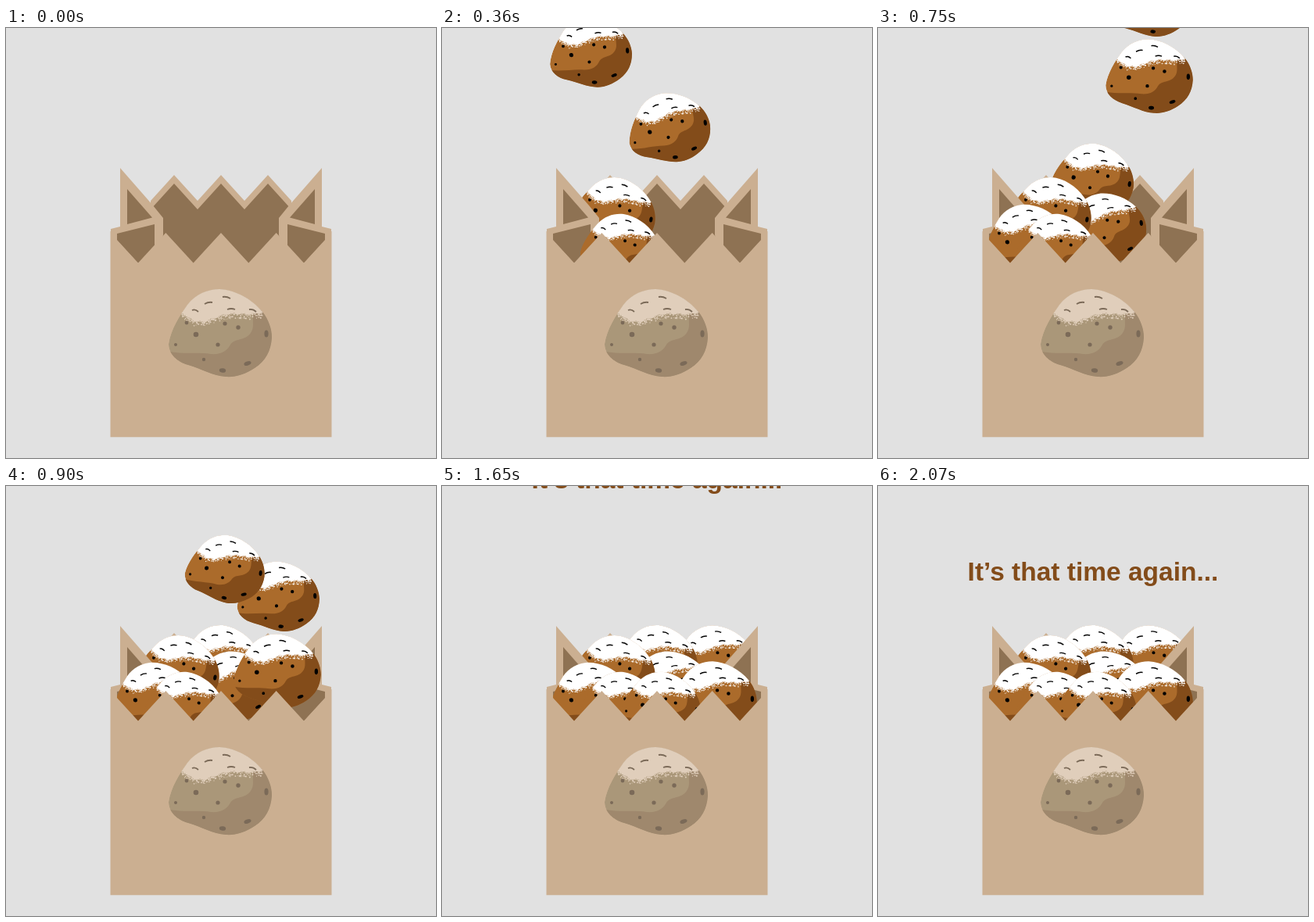
These frames come from a looping animation (550x550 px, 2.67 s). An HTML page with a canvas:

```html
<!DOCTYPE html>
<html lang="en">
<head>
<meta charset="utf-8">
<title>It’s that time again</title>
<style>
  html, body { margin: 0; height: 100%; overflow: hidden; background: #e1e1e1; }
  canvas { display: block; }
</style>
</head>
<body>
<canvas width="550" height="550"></canvas>
<script>
const ctx = document.querySelector('canvas').getContext('2d');
const LOOP = 2670, STEP = 30, FALL_SPEED = 35 / 30;
const PAPER = '#cbaf91', INSIDE = '#8e7253';
const FRESH = { crust: '#ab6b2b', shade: '#834c1a', sugar: '#fff', spot: '#000' };
const PRINTED = { crust: '#aa9779', shade: '#9f886d', sugar: '#e0cebb', spot: '#7b6a58' };

const points = (count, at) => Array.from({ length: count }, (_, i) => at(i));
const zigzag = (x, step, low, high) => points(7, i => [x + i * step, i % 2 ? high : low]);

// Bun shapes, drawn around (274, 390)
const body = new Path2D('M208 404C211 385 222 368 232 354C243 340 258 334 273 334C293 335 314 346 328 363C336 373 340 385 340 396C339 413 332 426 318 435C306 443 293 447 281 446C265 445 250 436 233 431C219 427 208 417 208 404Z');
const shade = new Path2D('M205 413C225 418 245 414 262 417C275 418 283 413 287 405C293 396 305 401 313 390C318 383 315 375 316 366L345 350V450H205Z');
const dashes = new Path2D('M238 361q4-2 8 2M254 353q5-3 10-2M277 344q5-1 10 2M283 360q5-2 10 0M311 360q5-1 9 3');

const spots = new Path2D();
function addSpot(x, y, rx, ry = rx, turn = 0) {
  spots.moveTo(x, y);
  spots.ellipse(x, y, rx, ry, turn, 0, 7);
}
addSpot(231, 377, 2.4);
addSpot(243, 392, 3.3);
addSpot(217, 405, 2);
addSpot(253, 424, 2.2);
addSpot(271, 405, 2.6);
addSpot(280, 378, 2.6);
addSpot(297, 383, 2.7);
addSpot(333, 391, 2.6, 4.5);
addSpot(309, 429, 4.7, 2.5, -0.3);
addSpot(277, 438, 4.2, 2.8, 0.1);

// Wavy lower edge of the icing, with loose grains below it
function icingEdge(x) {
  const a = (x - 224) / 104 * Math.PI;
  return 364 + 7 * Math.sin(a) + 5 * Math.sin(2 * a) + 3 * Math.sin(3 * a) + 0.8 * Math.sin(15 * a);
}
const sugar = new Path2D(`M${points(57, i => [220 + i * 2, icingEdge(220 + i * 2)])} 340 325 215 325Z`);
let seed = 11;
const random = () => (seed = seed * 16807 % 2147483647) / 2147483647;
for (let i = 0; i < 190; i++) {
  const x = 224 + random() * 104, y = icingEdge(x) + random() ** 2 * 6;
  sugar.moveTo(x, y);
  sugar.arc(x, y, 0.4 + random() * 0.6, 0, 7);
}

// x, resting y, degrees, landing time, scale; listed back to front
const backRow = [[348, 223, -2, 970], [275, 223, 7.5, 776], [290, 256, -9, 470], [221, 236, 10, 261]];
const frontRow = [[347, 271.5, 0, 930, .845], [190, 270.5, -4, 565], [228.5, 281, 6, 291, .77], [280.5, 281, 6, 1050, .77]];

function fill(color, path) {
  ctx.fillStyle = color;
  ctx.fill(path, 'nonzero');
}

function polygon(color, corners) {
  fill(color, new Path2D(`M${corners}Z`));
}

function drawBun(x, y, degrees, scale, colors) {
  ctx.save();
  ctx.translate(x, y);
  ctx.rotate(degrees * Math.PI / 180);
  ctx.scale(scale, scale);
  ctx.translate(-274, -390);
  ctx.clip(body);
  fill(colors.crust, body);
  fill(colors.shade, shade);
  fill(colors.sugar, sugar);
  fill(colors.spot, spots);
  ctx.strokeStyle = colors.spot;
  ctx.lineWidth = 1.8;
  ctx.stroke(dashes);
  ctx.restore();
}

function drawRow(row, t) {
  for (const [x, y, degrees, landing, scale = .8] of row) {
    drawBun(x, y - Math.max(0, landing - t) * FALL_SPEED, degrees, scale, FRESH);
  }
}

function drawFlap() {
  polygon(PAPER, '146 179 188 227 201 243 201 265 190 300 134 300 134 257 146 254');
  polygon(INSIDE, '155 206 155 251 187 242.5');
  polygon(INSIDE, '142 263 190 251 190 290 169 301 142 272');
}

function drawBag(t) {
  polygon(PAPER, [zigzag(185, 30, 221, 188), '365 300 185 300']);
  polygon(INSIDE, [zigzag(185, 30, 232, 199), '365 305 185 305']);
  drawRow(backRow, t);

  drawFlap();
  ctx.save();
  ctx.translate(550, 0);
  ctx.scale(-1, 1);
  drawFlap();
  ctx.restore();

  drawRow(frontRow, t);
  polygon(PAPER, ['133.5 260 142 260 142 271', zigzag(169, 35.33, 300.5, 262), '408 271 408 260 416.5 260 416.5 523.3 133.5 523.3']);
  drawBun(274, 390, 0, 1, PRINTED);
}

function drawTitle(progress) {
  ctx.font = 'bold 33.5px "Liberation Sans", Arial, sans-serif';
  ctx.textAlign = 'center';
  ctx.fillStyle = FRESH.shade;
  ctx.fillText('It’s that time again...', 275, 2.5 + 118.5 * progress);
}

function drawScene(t) {
  ctx.clearRect(0, 0, 550, 550);
  drawBag(t);
  if (t >= 1650) drawTitle(Math.min(1, (t - 1650) / 420));
}

const start = performance.now();
function tick() {
  const t = (performance.now() - start) % LOOP;
  drawScene(Math.floor(t / STEP) * STEP);
  requestAnimationFrame(tick);
}
tick();
</script>
</body>
</html>
```
